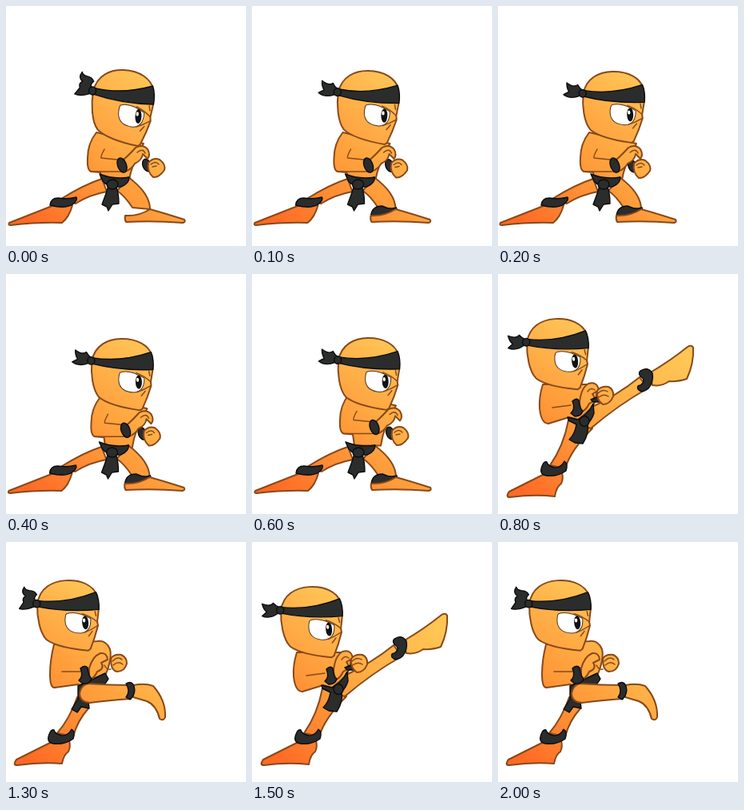
An HTML page for the animation above (2.1 s loop, 300 by 300 pixels).

```html
<!DOCTYPE html>
<html lang="en">
<head>
<meta charset="utf-8">
<title>Ninja kick</title>
<style>
  html, body { margin: 0; width: 100%; height: 100%; overflow: hidden; background: #fff; }
  svg { display: block; width: 100%; height: 100%; }
  path, ellipse { stroke-linejoin: round; stroke-linecap: round; }
  .skin { fill: url(#skin); stroke: #88491a; stroke-width: 2; }
  .cloth { fill: #2b2c2c; stroke: #0c0c0c; stroke-width: 1.4; }
  .line { fill: none; stroke: #88491a; stroke-width: 1.5; }
</style>
</head>
<body>
<svg viewBox="0 0 300 300">
  <defs>
    <linearGradient id="skin" gradientUnits="userSpaceOnUse" x1="200" y1="80" x2="20" y2="280">
      <stop offset="0" stop-color="#ffc555"/>
      <stop offset=".35" stop-color="#ffb046"/>
      <stop offset=".55" stop-color="#ff9b3a"/>
      <stop offset=".75" stop-color="#ff8431"/>
      <stop offset=".95" stop-color="#ff6a25"/>
    </linearGradient>
    <linearGradient id="face" x1=".8" y1="0" x2=".2" y2="1">
      <stop offset="0" stop-color="#ffc557"/>
      <stop offset="1" stop-color="#ffa03e"/>
    </linearGradient>
  </defs>

  <g id="stance">
    <g id="stanceTorso">
      <path class="skin" d="M113 158Q102 172 102 190Q101 206 107 207L118 208L120 222L153 222Q157 196 172 172Z"/>
      <path class="line" d="M123 179Q118 188 119 190L139 192M106 207L146 207"/>
    </g>
    <g id="stanceLegs">
      <path class="skin" d="M120 216Q98 223 69 241L87 247Q104 236 126 232Z"/>
      <path class="skin" d="M60 249L4 271Q2 274 6 274Q40 270 70 271Q79 264 83 249Z"/>
      <path class="cloth" d="M55 249Q56 240 65 240Q77 242 88 239Q90 243 83 248Q74 254 55 249Z"/>
      <path class="skin" d="M139 231Q149 238 158 252L180 254Q180 234 153 214Z"/>
      <path id="ankle" class="cloth" d="M149 263Q150 250 163 250Q173 255 181 252L182 257Q166 264 149 263Z"/>
      <path class="skin" d="M149 262Q166 263 180 254Q198 259 223 267Q225 270 221 271Q185 268 150 270Q148 267 149 262Z"/>
      <path class="cloth" d="M117 210Q134 217 154 214Q154 222 144 226Q128 227 121 219Z"/>
      <path class="cloth" d="M128 225Q124 238 120 248L126 251L128 256L133 248L141 247Q141 235 138 226Z"/>
      <ellipse class="cloth" cx="133" cy="223" rx="7" ry="6"/>
    </g>
    <g id="stanceFist">
      <ellipse class="cloth" cx="176" cy="199" rx="5" ry="8" transform="rotate(-20 176 199)"/>
      <path class="skin" d="M178 196Q184 189 192 192Q200 198 198 205Q191 215 184 214Q176 207 178 196Z"/>
      <path class="line" d="M181 198Q187 193 191 198M183 201L188 200"/>
    </g>
    <g id="stanceHand">
      <path class="skin" d="M146 193Q156 184 162 177Q171 172 177 179Q181 186 177 191L171 185Q170 193 161 197Q157 204 149 207Z"/>
      <path class="line" d="M164 183Q171 177 174 184"/>
      <ellipse class="cloth" cx="145" cy="199" rx="5.5" ry="9.5" transform="rotate(-20 145 199)"/>
    </g>
  </g>

  <g id="chamber">
    <path class="skin" d="M89 194Q80 220 64 239L84 243Q89 224 103 208Z"/>
    <path class="skin" d="M59 249Q41 258 13 272Q8 279 14 279Q44 275 70 277Q72 266 78 262Q81 256 79 248Z"/>
    <path class="cloth" d="M55 238Q49 250 59 252Q73 254 84 246Q87 237 82 234Q78 242 70 242Q61 240 60 235Q57 234 55 238Z"/>
    <g class="upper">
      <path class="skin" d="M60 128Q55 148 55 165Q55 183 61 182L90 178L98 182L124 167Q133 146 130 134Q125 122 114 124Z"/>
      <path class="line" d="M70 162L93 162"/>
    </g>
    <path class="cloth" d="M90 180L124 164L128 171Q122 183 102 190L104 208L94 206L89 213L82 209L90 196Z"/>
    <path class="skin" d="M159 179Q174 176 184 180Q200 198 199 219Q197 224 192 221Q188 204 176 199L159 194Z"/>
    <path class="skin" d="M102 177Q130 179 156 179L156 196Q128 198 105 201Q92 200 92 189Q94 179 102 177Z"/>
    <path class="cloth" d="M150 177Q157 173 160 180Q163 190 155 197L150 194Q156 187 150 177Z"/>
    <g class="upper">
      <path class="skin" d="M104 158Q108 143 118 139Q126 138 127 147L119 151Q124 158 114 162Q110 171 104 172Z"/>
      <path class="cloth" d="M93 158Q98 153 102 157Q103 167 107 171Q105 178 96 177L91 173Q97 168 93 158Z"/>
      <path class="skin" d="M131 146Q134 140 144 141Q151 144 151 152Q148 162 139 162Q131 161 131 146Z"/>
      <path class="line" d="M133 149Q140 142 145 147M134 154Q140 148 146 153M123 154Q126 160 131 159"/>
    </g>
  </g>

  <g id="kick">
    <path class="skin" d="M88 183Q82 215 65 239L84 243Q91 220 118 193Z"/>
    <path class="skin" d="M60 249Q42 258 14 272Q9 279 15 279Q45 275 71 278Q73 266 79 262Q82 256 80 248Z"/>
    <path class="cloth" d="M56 238Q50 250 60 252Q74 254 85 246Q88 237 83 234Q79 242 71 242Q62 240 61 235Q58 234 56 238Z"/>
    <path class="skin" d="M189 124Q216 108 237 91Q242 88 244 92Q245 112 236 131Q224 135 214 134Q204 141 193 139Z"/>
    <path class="skin" d="M112 169Q150 151 177 129L187 143Q150 164 116 193L100 188Z"/>
    <path class="cloth" d="M178 121Q187 115 193 124Q195 135 188 143Q180 150 175 144Q173 139 178 139Q186 133 178 128Q175 124 178 121Z"/>
    <path class="skin" d="M56 138Q51 154 52 168Q54 187 63 187L89 179L100 182L118 167Q126 152 122 138Z"/>
    <path class="line" d="M68 167L91 164"/>
    <path class="cloth" d="M87 179L100 182Q112 176 119 162L120 174Q117 183 112 187Q114 200 106 212L96 211L89 207Q96 200 98 188L88 183Z"/>
    <ellipse class="cloth" cx="108" cy="184" rx="6" ry="6.5"/>
    <path class="skin" d="M102 160Q104 142 113 137Q124 134 126 145L118 150Q124 157 114 162Q110 171 103 173Z"/>
    <path class="line" d="M112 147Q116 141 121 145"/>
    <path class="cloth" d="M93 159Q98 154 101 158Q102 168 106 171Q104 178 96 178L91 174Q97 169 93 159Z"/>
    <path class="cloth" d="M116 157L126 153L127 160L119 160Z"/>
    <path class="skin" d="M124 146Q128 140 138 141Q145 144 144 153Q140 163 131 163Q123 158 124 146Z"/>
    <path class="line" d="M125 149Q131 143 137 147M126 154Q132 149 138 153"/>
  </g>

  <g id="head">
    <g transform="translate(0 28)">
      <path id="tailUp" class="cloth" d="M-1-4Q-4-8 1-12Q-1-17-8-18Q-13-19-14-23Q-19-16-13-11Q-18-9-16-3L-22 5Q-15 8-4 4Z"/>
      <path id="tailLow" class="cloth" d="M-1-4Q-5-6-8-10Q-12-5-22-10Q-21-3-17 1L-23 6Q-14 11-3 4Z"/>
    </g>
    <path class="skin" style="fill:url(#face)" d="M1 28C5 8 21 0 38 0C58 0 72 9 76 22L77 40L74 57L74.5 62Q70 77 63 92L60 94C42 91 20 86 9 76C1 66-1 44 1 28Z"/>
    <path d="M36 44Q48 40 66 52Q66 70 52 70.5Q35 69 34 55Q34 47 36 44Z" fill="#fff" stroke="#50331c"/>
    <ellipse cx="59" cy="57" rx="4" ry="9" fill="#111"/>
    <ellipse cx="57.6" cy="54" rx="1.7" ry="2.7" fill="#fff"/>
    <path class="line" d="M56 45Q66 49 74 57M74 62Q66 67 57 70M62 75L67 69M72 43L73 49"/>
    <path class="cloth" d="M1 24Q36 31 75 18Q79 29 77 41Q36 42 1 32Z"/>
    <ellipse class="cloth" cx="0" cy="28" rx="4.5" ry="5"/>
  </g>
</svg>
<script>
const LOOP = 2100;
const el = id => document.getElementById(id);
const uppers = document.querySelectorAll('.upper');
const mix = (a, b, k) => a.map((v, i) => v + (b[i] - v) * k);
const move = (node, x, y) => node.setAttribute('transform', `translate(${x} ${y})`);
const show = (node, on) => node.setAttribute('display', on ? 'inline' : 'none');

// Idle sway: head x, top, height scale, tilt; torso x, y; fist x, y; feet x
const START = [107, 80, 1, 3, 0, 0, 0, 0, 0];
const LOW = [106, 82, .95, -1, 1, 0, -8, 1, -1];
const HIGH = [107.5, 80, .96, -1, 8, -7.5, -3, 0, 0];

function placeHead(x, y, scale, tilt, tailUp, tailTilt) {
  el('head').setAttribute('transform',
    `translate(${x} ${y}) scale(1 ${scale}) rotate(${tilt} 38 47)`);
  show(el('tailUp'), tailUp);
  show(el('tailLow'), !tailUp);
  el('tailLow').setAttribute('transform', `rotate(${tailTilt})`);
}

function drawStance(step) {
  const [x, y, scale, tilt, tx, ty, fx, fy, feet] =
    step < 2 ? mix(START, LOW, step / 2) : mix(LOW, HIGH, (step - 2) / 4);
  placeHead(x, y, scale, tilt, step === 0, 12);
  move(el('stanceTorso'), tx, ty);
  move(el('stanceHand'), tx, ty);
  move(el('stanceFist'), fx, fy);
  move(el('stanceLegs'), feet, 0);
  show(el('ankle'), step > 0);
}

function drawChamber(rising) {
  const [dx, dy] = rising ? [5, 10] : [0, 0];
  placeHead(39.5 + dx, 48 + dy, .95, -4, true, 0);
  uppers.forEach(node => move(node, dx, dy));
}

function draw(time) {
  const step = Math.floor(time % LOOP / 100);
  const pose = step < 7 ? 'stance'
    : step === 7 || step === 13 || step === 14 || step === 20 ? 'chamber' : 'kick';
  ['stance', 'chamber', 'kick'].forEach(id => show(el(id), id === pose));
  if (pose === 'stance') drawStance(step);
  else if (pose === 'chamber') drawChamber(step === 7);
  else placeHead(36.5, 56, .955, -4, false, 0);
}

let start;
function tick(now) {
  start ??= now;
  draw(now - start);
  requestAnimationFrame(tick);
}
draw(0);
requestAnimationFrame(tick);
</script>
</body>
</html>
```
